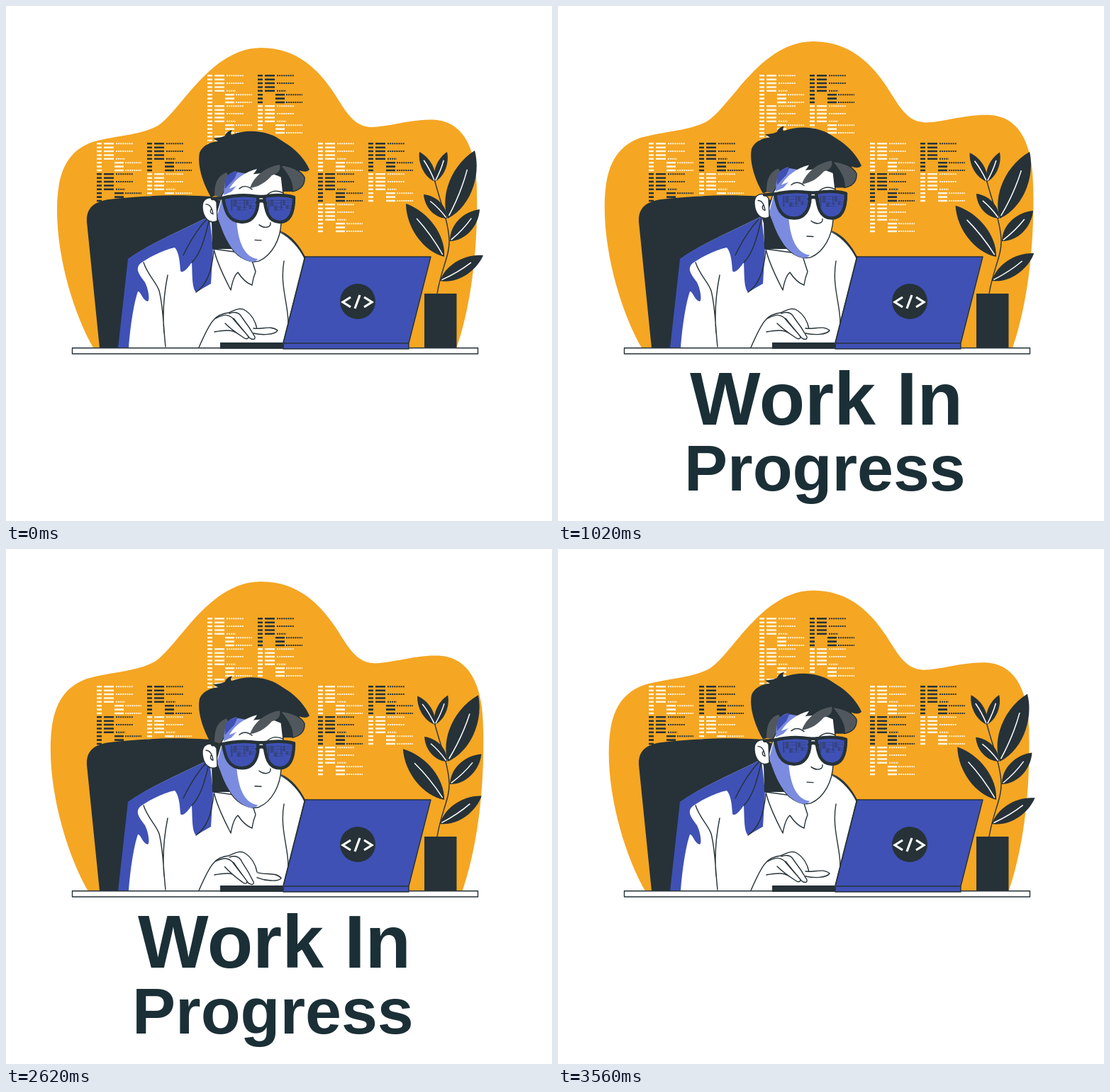
An HTML page for the animation above (3.6 s loop, 770 by 727 pixels).

```html
<!DOCTYPE html>
<html lang="en">
<head>
<meta charset="utf-8">
<title>Work In Progress</title>
<style>
  html, body { margin: 0; width: 100%; height: 100%; overflow: hidden; background: #fff; }
  svg { display: block; width: 100vw; height: 100vh; }
  text { font-family: "Liberation Sans", Arial, sans-serif; font-weight: bold; fill: #1b2f36; }
  .dark { fill: #263238; }
  .blue { fill: #3f51b5; }
  .shade { fill: #7b8be0; }
  .grey { fill: #51585d; }
  .white { fill: #fff; }
  .line { stroke: #263238; stroke-width: 1.4; stroke-linejoin: round; stroke-linecap: round; }
  .open { fill: none; }
</style>
</head>
<body>
<svg viewBox="0 0 770 727">
  <defs>
    <g id="code" fill="none" stroke-width="2.6">
      <path id="dashes"/>
      <path id="dots" stroke-width="2" stroke-dasharray="2 1.1"/>
    </g>
  </defs>

  <path id="blob" fill="#f5a623" d="M124 484C97 438 72 358 72 288C72 235 86 205 122 192C158 182 188 183 214 169C246 149 288 59 360 59C412 59 442 92 462 122C480 150 490 170 515 171C540 171 575 158 608 161C650 166 664 210 664 262C666 355 653 432 635 484Z"/>
  <g id="wall"></g>

  <path class="dark" d="M132 483L114 305C113 285 124 276 146 273C200 267 250 266 290 269L388 318C403 324 415 340 422 354V483Z"/>

  <path class="line open" d="M608 406C614 370 626 352 625 330C624 305 612 275 605 248"/>
  <g id="plant"></g>
  <path class="dark" d="M590 406h45.500v77h-45.500z"/>

  <!-- shirt -->
  <path class="white" d="M159 483L173 357C200 337 245 318 287 297L300 340H350L386 318C403 328 415 343 421 356L393 483Z"/>
  <path class="blue" d="M158 483L172 357C200 337 245 318 287 297L292 343L289 392L268 404C262 398 263 380 262 362C255 372 249 378 246 374C245 360 244 348 238 341C222 344 195 358 188 365C183 372 187 378 196 390C201 400 203 415 200 417C192 415 190 402 186 403C180 420 175 455 173 483Z"/>
  <path class="line open" d="M194 362C200 380 212 390 216 402C222 425 222 455 225 481M228 380C222 410 221 440 223 462M392 360C386 395 398 420 398 447M386 319C403 328 415 343 421 356M283 301C270 315 258 335 250 352M287 300C280 330 274 350 262 362"/>
  <path class="white line" d="M293 343C298 365 310 387 317 401C319 390 322 380 327 376C333 385 341 392 347 394C348 386 350 380 352 375L344 350Z"/>
  <path class="line open" d="M293 346C290 375 283 394 268 404"/>
  <path class="dark" d="M290 303L314 330L328 343H291Z"/>

  <g id="head">
    <path class="dark" d="M289 270C279 253 269 226 273 207C277 197 288 192 299 191L292 187C300 186 306 185 309 183C310 179 314 176 319 175C317 178 317 180 318 182C342 173 368 177 384 187L398 196C410 204 422 217 428 231C424 235 419 234 414 232C416 244 414 256 404 262H310Z"/>
    <path class="grey" d="M294 268C294 252 297 240 311 235L316 244L306 270Z"/>
    <path class="white line" d="M304 268L318 243L350 233L388 238L391 265C389 280 390 292 388 306C387 330 375 352 357 360C345 364 328 356 318 342C308 325 302 308 296 295Z"/>
    <path class="shade" d="M298 296C308 330 322 355 345 361C350 362 354 359 355 357C337 355 327 335 325 300L305 270ZM307 267C308 250 309 236 325 233L344 232L318 262Z"/>
    <path class="blue" d="M309 258C307 242 312 236 327 233L322 244Z"/>
    <path class="dark" d="M324 234C340 222 368 215 388 222L398 246L384 240C370 234 356 236 346 238Z"/>
    <path class="grey" d="M344 257C350 240 366 227 386 224C388 232 383 237 375 239C367 248 358 255 344 257Z"/>
    <path class="grey line" d="M387 225C402 226 416 232 421 242C422 253 415 260 404 262C405 249 398 238 387 225Z"/>
    <path class="white" d="M315 258C322 245 337 234 354 230C347 243 332 252 315 258Z"/>
    <path class="line open" d="M329 258C336 252 342 255 347 259M369 266C375 261 383 260 391 264" stroke-width="3"/>
    <path class="white line" d="M297 277C289 266 276 271 277 285C278 300 288 309 298 303Z"/>
    <path class="line open" d="M282 280C289 280 291 287 292 294C288 293 287 289 290 286M357 309C363 314 374 314 373 306M351 330.500L360 331"/>
    <g class="blue line" style="stroke-width:4.500">
      <path d="M306 271Q330 265 355 269C357 285 352 305 333 305C314 305 309 290 306 271Z"/>
      <path d="M364 269Q388 265 406 270C406 290 401 305 386 305C370 305 366 290 364 269Z"/>
      <path class="open" d="M291 272L307 271M354 278Q360 272 366 278M354 269H365"/>
    </g>
    <g id="reflections" opacity=".8"></g>
  </g>

  <!-- hand -->
  <path class="white" d="M272 483C280 465 286 446 300 438C315 430 325 424 334 427C346 432 352 446 354 456L351 470L322 476L312 483Z"/>
  <path class="line open" d="M272 482C279 466 286 450 293 443C298 437 306 434 314 433C322 430 330 424 338 430C347 436 352 446 354 456M294 460C305 458 314 457 320 459L341 468"/>
  <path id="finger" class="white line" d="M349 455C360 457 374 450 383 458C379 464 362 465 349 462"/>
  <g id="fingers" class="white line">
    <path d="M296 441C308 434 314 436 319 440C326 448 331 455 341 464C344 470 339 471 335 468C324 461 314 453 309 448"/>
    <path d="M315 434C325 430 330 434 333 440C340 449 346 458 351 467C352 472 346 471 343 468C335 458 327 449 321 441"/>
  </g>

  <!-- desk and laptop -->
  <path class="white line" d="M93.500 482.700H665.500V491H93.500Z"/>
  <path class="dark" d="M302 475H392V484H302ZM421 353L390 476H395L426 354Z"/>
  <path class="blue line" d="M422 354H599L568 476H391ZM391 476H568V484H391Z"/>
  <circle class="dark" cx="496" cy="417" r="25"/>
  <path d="M486 411L475 418L486 425M505 411L516 418L505 425M499 408L492 427" fill="none" stroke="#fff" stroke-width="3.200"/>

  <text id="top" x="186" y="591" font-size="105.500">Work In</text>
  <text id="bottom" x="178" y="684" font-size="91.500">Progress</text>
</svg>
<script>
const $ = id => document.getElementById(id);
const LOOP = 3600, BEAT = 1200;
const INK = '#263238', PAPER = '#fff6df';

// One block of pretend source code
let dashes = '', dots = '';
const addRun = (x, row, width) => `M${x} ${row * 5.38 + 1.3}h${width}`;
for (let row = 0; row < 8; row++) {
  dashes += addRun(0, row, 7);
  if (row < 5) dashes += addRun(10, row, 14);
  else dashes += addRun(25, row, 13);
  if (row < 5 && row % 2 == 0) dots += addRun(27, row, row < 4 ? 24 : 13);
  if (row == 5 || row == 7) dots += addRun(40, row, 23);
}
$('dashes').setAttribute('d', dashes);
$('dots').setAttribute('d', dots);

const codeBlock = (x, y, color, scale = 1) =>
  `<use href="#code" stroke="${color}" transform="translate(${x} ${y}) scale(${scale})"/>`;

// Each cluster: left edge, top, and block colours in rows of two
const clusters = [[284, 97, 'wdwww'], [128, 193, 'wddww'], [440, 193, 'wddww']];
$('wall').innerHTML = clusters.map(([x, y, colors]) => [...colors].map((c, i) =>
  codeBlock(x + i % 2 * 71, y + (i >> 1) * 43, c == 'd' ? INK : PAPER)).join('')).join('');
$('reflections').innerHTML = [317, 369].map(x =>
  codeBlock(x, 274, INK, .36) + codeBlock(x + 18, 274, INK, .3)).join('');

// Leaf: base, tip, width, sway in degrees
const leaves = [
  [605, 248, 583, 206, 15, -7], [605, 248, 622, 206, 14, 3],
  [623, 300, 661, 204, 34, 5.5], [622, 300, 589, 266, 18, 3.5],
  [626, 332, 668, 287, 23, 6], [618, 354, 564, 279, 29, -6],
  [612, 388, 673, 352, 23, -6]
];
$('plant').innerHTML = leaves.map(([x, y, tipX, tipY, width]) => {
  const length = Math.hypot(tipX - x, tipY - y);
  const angle = Math.atan2(tipY - y, tipX - x) * 180 / Math.PI;
  const l = k => length * k;
  const w = width * .67;
  return `<g><g transform="translate(${x} ${y}) rotate(${angle})">
    <path class="dark" d="M0 0C${l(.25)} ${-w} ${l(.7)} ${-w} ${length} 0C${l(.7)} ${w} ${l(.25)} ${w} 0 0Z"/>
    <path d="M${l(.04)} 0Q${l(.4)} ${width * .12} ${l(.72)} 0" fill="none" stroke="#fff" stroke-width="1.500"/>
  </g></g>`;
}).join('');
const leafNodes = [...$('plant').children];

const clamp = v => Math.max(0, Math.min(1, v));
const move = (node, value) => node.setAttribute('transform', value);

function rise(node, t, start, end) {
  const shown = clamp((t - start) / (end - start));
  move(node, `translate(0 ${30 * (1 - shown)})`);
  node.setAttribute('opacity', shown * clamp((3440 - t) / 200));
}

function draw(now) {
  const t = now % LOOP;
  const turn = t / BEAT * 2 * Math.PI;

  const scale = 1 + .0515 * (1 - Math.cos(turn));
  move($('blob'), `translate(369 484) scale(${scale}) translate(-369 -484)`);

  const nod = -1.7 + 6 * Math.cos((t - 250) / BEAT * 2 * Math.PI);
  move($('head'), `translate(0 ${nod})`);

  const sway = Math.abs(Math.sin(turn / 2));
  leaves.forEach(([x, y, , , , degrees], i) =>
    move(leafNodes[i], `rotate(${degrees * sway} ${x} ${y})`));

  const press = Math.max(0, Math.sin(turn));
  move($('finger'), `translate(${6 * press} ${2 * press}) rotate(${9 * press} 349 458)`);
  move($('fingers'), `rotate(${4 * press} 300 440)`);

  rise($('top'), t, 40, 300);
  rise($('bottom'), t, 140, 415);
}

const begin = performance.now();
function tick() {
  draw(performance.now() - begin);
  requestAnimationFrame(tick);
}
tick();
</script>
</body>
</html>
```
